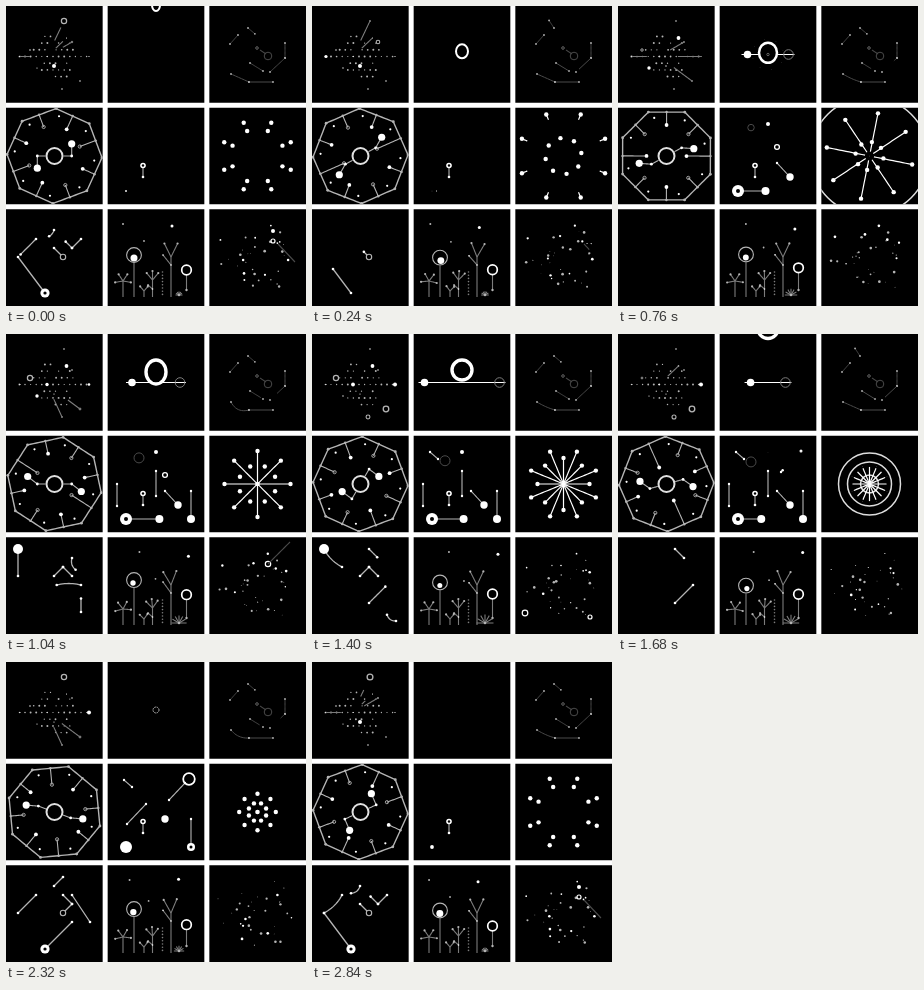
Recreate the animation shown at these times as an HTML page with a canvas. Size 300 by 300 pixels, loop 2.88 s.

```html
<!DOCTYPE html>
<html>
<head>
<meta charset="utf-8">
<style>
  html, body { margin: 0; width: 100%; height: 100%; overflow: hidden; background: #fff; }
  canvas { display: block; width: 300px; height: 300px; }
</style>
</head>
<body>
<canvas id="stage" width="300" height="300"></canvas>
<script>
const ctx = document.getElementById('stage').getContext('2d');
const TICKS = 72, TICK_MS = 40, GAP = 5, CELL = (300 - 2 * GAP) / 3;
const WHITE = '#fff', LIGHT = '#b4b4b4', GRAY = '#7c7c7c', DIM = '#4a4a4a', BLACK = '#000';
const TAU = Math.PI * 2, DEG = Math.PI / 180;
let tick = 0, turn = 0; // turn is the loop's progress in radians

const wrap = (v, size) => ((v % size) + size) % size;
const clamp = v => Math.max(0, Math.min(1, v));
const mix = (a, b, p) => a + (b - a) * p;
const smooth = v => (v = clamp(v), v * v * (3 - 2 * v));
const polar = (cx, cy, r, a) => [cx + r * Math.cos(a), cy + r * Math.sin(a)];

function seeded(seed) {
  return () => (seed = (seed * 16807) % 2147483647) / 2147483647;
}

// 0..1 envelope that fades in at one tick and is gone at another.
function shown(from, to, fade = 5) {
  const age = wrap(tick - from, TICKS), life = wrap(to - from, TICKS);
  return smooth(age / fade) * smooth((life - age) / fade);
}

// Eased value between [tick, value] points.
function keyed(...points) {
  let value = points[0][1];
  for (let i = 1; i < points.length; i++) {
    const [t0, v0] = points[i - 1], [t1, v1] = points[i];
    if (tick >= t0) value = mix(v0, v1, smooth((tick - t0) / (t1 - t0)));
  }
  return value;
}

function dot(x, y, r, color = WHITE) {
  if (r < .15) return;
  ctx.fillStyle = color;
  ctx.beginPath();
  ctx.arc(x, y, r, 0, TAU);
  ctx.fill();
}

function ring(x, y, r, width = 1, color = WHITE, ry = r) {
  if (r < .3) return;
  ctx.strokeStyle = color;
  ctx.lineWidth = width;
  ctx.beginPath();
  ctx.ellipse(x, y, r, Math.max(0, ry), 0, 0, TAU);
  ctx.stroke();
}

// Part of a line or of a bent stroke, between the fractions from and to.
function stroke([x1, y1], [x2, y2], { color = LIGHT, width = 1.1, bend = 0, from = 0, to = 1, ends = 0 } = {}) {
  if (to - from < .02) return;
  const length = Math.hypot(x2 - x1, y2 - y1) || 1;
  const point = p => {
    const sag = 4 * bend * p * (1 - p) / length;
    return [mix(x1, x2, p) - (y2 - y1) * sag, mix(y1, y2, p) + (x2 - x1) * sag];
  };
  ctx.strokeStyle = color;
  ctx.lineWidth = width;
  ctx.beginPath();
  for (let i = 0; i <= 12; i++) ctx.lineTo(...point(mix(from, to, i / 12)));
  ctx.stroke();
  if (ends) for (const p of [from, to]) dot(...point(p), ends);
}

// A stroke that grows from its start, rests, and leaves through its end.
function streak(a, b, start, span, options = {}) {
  const p = wrap(tick - start, TICKS) / span;
  if (p < 1) stroke(a, b, { ...options, from: clamp(4 * p - 3), to: clamp(4 * p) });
}

function dotField() {
  const center = [41, 50.5], random = seeded(29);
  for (let row = -3; row <= 3; row++) {
    for (let col = -6; col <= 6; col++) {
      const chance = random(), reach = Math.abs(col - .5) + Math.abs(row);
      if (row && (reach > 5 || chance > .55)) continue;
      const twinkle = .2 * Math.sin(turn + col + row * 2);
      dot(center[0] + 6 + col * 5.6 + (row % 2) * 2.5, center[1] + row * 6.7, .8 + twinkle, LIGHT);
    }
  }
  const satellite = (x, y, grow, shrink, r, hollow) => {
    const size = mix(.6, r, shown(grow, shrink, 8));
    if (hollow) ring(x, y, size, .6 + size * .25, LIGHT);
    else dot(x, y, size);
    if (Math.hypot(x - center[0], y - center[1]) < 25) return;
    const near = [mix(center[0], x, .45), mix(center[1], y, .45)];
    for (const start of [grow - 8, shrink - 8]) streak(near, [x, y], start, 12, { color: GRAY });
  };
  satellite(58, 15, 52, 6, 3, true);
  satellite(66, 36, 70, 18, 1.8, true);
  satellite(24, 44, 16, 44, 2.6, true);
  satellite(74, 75, 24, 60, 2.8, true);
  satellite(56, 83, 28, 58, 2, true);
  satellite(60.5, 32, 6, 44, 1.9);
  satellite(14, 50.5, 70, 20, 1.6);
  satellite(83, 50.5, 22, 66, 2);
  satellite(41, 50.5, 20, 44, 1.9);
  satellite(48, 60, 62, 20, 2);
  satellite(31, 62, 5, 36, 1.7);
}

function balance() {
  const cx = 150, cy = 48.5;
  const spread = keyed([6, 0], [12, 17], [26, 24], [35, 37.5], [48, 1.5]);
  const visible = shown(6, 54), gear = shown(7, 20);
  const half = (spread + 6) * shown(6, 49, 3);
  stroke([cx - half, cy], [cx + half, cy], { color: WHITE });

  if (tick < 46) {
    const y = keyed([0, -1], [7, 48], [17, 48], [26, 38], [36, 36], [45, -20]);
    const rx = keyed([0, 4], [12, 8], [26, 10]), ry = keyed([0, 6], [12, 8], [26, 12], [35, 10]);
    ctx.fillStyle = BLACK;
    ctx.beginPath();
    ctx.ellipse(cx, y, rx, ry, 0, 0, TAU);
    ctx.fill();
    ring(cx, y, rx, keyed([0, 2], [14, 2], [26, 3.4]), WHITE, ry);
  }
  ring(cx, cy, 11.5 * gear, 2.4 * gear + .1);
  for (let i = 0; i < 16; i++) dot(...polar(cx, cy, 13 * gear, i / 16 * TAU), gear);
  for (let i = 0; i < 8; i++) {
    const [x, y] = polar(cx, cy, mix(14, 28, gear), (i / 8 + tick / 90) * TAU);
    dot(x, y, 2 * gear, LIGHT);
    dot(x + 1, y + .7, 1.5 * gear, BLACK);
  }
  ring(cx + spread, cy, 4.8 * visible, 1, GRAY);
  dot(cx - spread, cy, 3.8 * visible);
  ctx.setLineDash([1.6, .8]);
  ring(cx, 48, 3 * shown(53, 65), 1, LIGHT);
  ctx.setLineDash([]);
}

function constellation() {
  const swing = turn * 2, wave = Math.cos(swing);
  const pivot = [242, 22], tip = polar(...pivot, 9, .7 - 3.8 * Math.max(0, Math.sin(swing)) ** 2);
  const link = (a, b, options) => {
    stroke(a, b, { color: DIM, width: 1, ...options });
    dot(...a, .9, LIGHT);
    dot(...b, .9, LIGHT);
  };
  link([224, 38], [232, 29]);
  link(pivot, tip);
  link([279, 37], [279, 52]);
  link([279, 52], [264, 66], { to: .6 + .4 * wave });
  link([244, 57], [257, 65], { to: .85 + .15 * wave });
  link([225, 68], [243, 76], { bend: 4 * Math.max(0, -Math.sin(swing)) });
  link([243, 76], [267, 76]);
  stroke([254, 44], [260, 48], { color: DIM });
  ring(262, 50, 3.8, 1, DIM);
  ring(251, 42, 1.3, .8, GRAY);
}

function wheel() {
  const center = [48.5, 150], sides = 8, step = TAU / sides;
  const half = tick / 36, eased = Math.floor(half) + smooth(half % 1);
  const spin = -88 * DEG - eased * step, sweep = (-75 + (tick - 58) * 2.5) * DEG;
  for (let i = 0; i < sides; i++) {
    const a = spin + i * step, middle = a + step / 2;
    const pull = Math.abs(Math.cos(middle - sweep)) ** 20;
    const vertex = polar(...center, 47.5, a), foot = polar(...center, 44, middle);
    const head = polar(...center, 31 - 13 * pull, middle);
    stroke(vertex, polar(...center, 47.5, a + step), { width: 1.4 });
    stroke(foot, head);
    dot(...vertex, 1.4, LIGHT);
    dot(...foot, 1.2, LIGHT);
    dot(...polar(...center, 40, a + step * .1), 1.1);
    if (i % 2) ring(...head, 1.6, .9, LIGHT);
    else dot(...head, 1.9);
  }
  ring(...center, 8, 2, '#e0e0e0');
  const upper = keyed([0, 0], [12, -57], [26, 0], [35, -60], [48, 20], [58, 20], [72, -25]) * DEG;
  const lower = keyed([0, -90], [12, -30], [26, 38], [48, 35], [58, 5], [72, -115]) * DEG;
  for (const side of [0, Math.PI]) {
    const joint = polar(...center, 17.2, upper + side), weight = polar(...joint, 12.2, lower + side);
    stroke(polar(...center, 9, upper + side), joint);
    stroke(joint, weight);
    dot(...joint, 1.4);
    dot(...weight, 3.6);
  }
}

function rods() {
  const rod = (a, b, from, to) => stroke(a, b, { to: shown(from, to), ends: 1.2 });
  const donut = (x, y, r, hole) => {
    dot(x, y, r);
    dot(x, y, hole, BLACK);
  };
  stroke([137, 159], [137, 171], { ends: 1.3 });
  donut(137, 159.5, 2.8, 1.2);

  rod([118, 118], [126, 125], 26, 70);
  ring(133, 124 + 4 * Math.sin(turn - 2.3), 5 * shown(16, 56), 1, DIM);
  dot(150, 118, 2 * shown(6, 43));
  rod([150, 162], [150, 137], 19, 55);
  ring(159, 141, 2.4 * shown(6, 32), 1.3);
  rod([147, 153], [152, 148], 7, 18);
  rod([121, 162], [140, 142], 42, 65);
  rod([111, 172], [111, 150], 19, 55);

  const slide = keyed([48, 0], [57, 1]), weight = 3.7 * shown(6, 67);
  rod([172, 171], [159, 157], 12, 54);
  dot(mix(172, 159, slide), mix(171, 157, slide), weight);
  rod([185, 185], [185, 157], 19, 63);
  donut(185, 185, 4 * shown(19, 68), 1.5 * shown(50, 68));
  rod([163, 138], [179, 121], 41, 68);
  ring(183, 117, 5.8 * shown(41, 68), 1.8);

  const puck = shown(5, 54), puckX = 120 + 34 * Math.sin(Math.PI * clamp((tick - 4) / 50));
  if (puck) stroke([125, 185], [puckX, 185]);
  dot(puckX, 185, 4 * puck);
  donut(120, 185, 6 * shown(5, 2, 8), 2 * shown(6, 54));
}

function burst() {
  const center = [251.5, 150];
  for (const start of [7.2, 35.8, 37.6, 40.2, 42.8]) {
    const r = (tick - start) * 5;
    if (r > 0 && r < 72) ring(...center, r, 1.5, '#ddd');
  }
  const inner = keyed([0, 27], [12, 9.2], [26, 19], [35, 35], [46, 12], [58, 9.3], [71, 27]);
  const outer = keyed([0, 36], [12, 54], [26, 33], [35, 26], [46, 13], [58, 18.3], [71, 36]);
  const innerShift = keyed([0, .5], [11, 1], [14, 1], [25, 1.5]);
  const outerShift = keyed([0, .5], [13, .5], [25, 0], [58, 0], [71, .5]);
  const dotSize = 2.2 * (1 - shown(38, 58)), spokes = shown(15, 56);
  for (let i = 0; i < 8; i++) {
    const near = polar(...center, inner, (i + innerShift) * TAU / 8);
    const far = polar(...center, outer, (i + outerShift) * TAU / 8);
    stroke(center, near, { color: WHITE, width: 1.2, to: shown(28, 46) });
    stroke(center, far, { color: WHITE, width: 1.2, from: spokes ? 1 - spokes : 1 - .2 * shown(3, 16) });
    dot(...near, dotSize);
    dot(...far, dotSize);
  }
  dot(...center, 2.3 * (shown(18, 34) + shown(51, 66)));
}

function strokes() {
  // Columns and rows of a nine pixel lattice.
  const node = (col, row) => [12 + 9 * col, 215 + 9 * row];
  const draw = (start, span, a, b, bend = 0) =>
    streak(node(...a), node(...b), start, span, { bend, ends: 1.3, width: 1.3 });

  draw(6, 13, [0, 4], [5, 4]);
  draw(6, 13, [0, 5], [3.4, 7.6], -3);
  draw(6, 13, [4, 1], [5, 2]);
  draw(6, 13, [6, 1], [7, 2]);
  draw(6, 13, [7, 0], [7, 2]);

  draw(20, 12, [0, 0], [0, 3]);
  draw(20, 22, [4, 3], [5, 2]);
  draw(20, 22, [5, 2], [6, 3]);
  draw(21, 11, [4.3, 4], [7, 4], -1.5);
  draw(21, 11, [7, 5.5], [7, 7]);
  draw(21, 11, [6, 1], [6.4, 2.3], 2);

  draw(30, 11, [0, 0], [2, 2], 2);
  draw(30, 22, [5, 0], [6, 1]);
  draw(30, 22, [5, 6], [7, 4]);
  draw(31, 9, [7, 7.3], [8, 8], 2);

  draw(43, 11, [2.7, -.7], [2, 2], -3);
  draw(43, 11, [8, 5], [8, 8]);
  draw(44, 34, [5, 2], [6, 3]);

  draw(50, 28, [0, 4], [2, 2], tick > 60 ? 2 : 0);
  draw(53, 11, [4, 1], [5, 0]);
  draw(53, 11, [5, 4], [6, 3]);
  draw(53, 11, [6, 2], [8, 5]);
  draw(53, 11, [3, 8], [6, 5]);

  draw(63, 18, [0, 4], [3, 8]);
  draw(66, 11, [7, 2], [6, 3]);
  draw(66, 14, [4, 3], [5, 4]);
  draw(67, 6, [3, 1.8], [4, 1], 2);

  const hub = 4.6 * shown(53, 7);
  dot(...node(0, 0), 5 * shown(21, 42));
  dot(...node(7, 0), 2 * shown(6, 18));
  dot(...node(3, 8), hub);
  dot(...node(3, 8), hub * .35, BLACK);
  const eye = 2.7 * shown(43, 18);
  dot(...node(5, 4), eye, BLACK);
  ring(...node(5, 4), eye, 1.1, LIGHT);
}

function garden() {
  const ground = 291, wave = Math.cos(turn), sway = Math.sin(turn * 2);
  const stem = (x, top) => stroke([x, ground], [x, top], { color: GRAY });
  // A stem with a fan of twigs at its top.
  const sprig = (x, top, size, twigs, spread) => {
    stem(x, top);
    for (let i = 0; i < twigs; i++) {
      const tip = polar(x, top, size, (-90 + mix(-spread, spread, i / (twigs - 1)) + sway * 5) * DEG);
      stroke([x, top], tip, { color: GRAY });
      dot(...tip, 1.1, LIGHT);
    }
  };
  sprig(117, 275, 8, 4, 100);
  sprig(138, 285, 6, 2, 40);
  sprig(146.5, 274, 9, 3, 40);
  sprig(165, 251, 15, 2, 26);
  stroke([165, 259], [157, 249 + sway], { color: GRAY, ends: .8 });
  stroke([146.5, 283], [142, 279], { color: GRAY, ends: .8 });
  for (let y = 266; y < ground; y += 3.2) dot(156.5, y, .8, GRAY);

  const headY = 249 + 3 * sway;
  stem(128, headY + 8);
  ring(128, headY, 7.4, 1.1, LIGHT);
  dot(128 + sway, headY + 3, 3 + .5 * wave);

  const bulbY = 262 + 2 * wave;
  stroke([180.5, bulbY + 5], [180.5, 284], { color: GRAY });
  ring(180.5, bulbY, 4.8, 1.7);
  dot(180.5, 284, 1.2, LIGHT);

  for (let i = 0; i < 7; i++) {
    stroke([173, 289], polar(173, 289, 6 - 2.5 * wave, -Math.PI * i / 6), { color: GRAY });
  }
  dot(173, 289, 1.3, LIGHT);

  dot(176 - 10 * wave, 220 + 3 * Math.sin(turn), 1.5);
  dot(127 - 10 * wave, 218, 1, LIGHT);
  dot(145 - 7 * wave, 241 - 6 * wave, .9, LIGHT);
}

function starfield() {
  const random = seeded(77);
  for (let i = 0; i < 34; i++) {
    const x = 251 + (random() + random() - 1) * 42, y = 253 + (random() + random() - 1) * 38;
    const glow = .5 + .5 * Math.sin(turn + random() * TAU), heading = random() * TAU;
    dot(...polar(x, y, 4 * Math.sin(turn), heading), .35 + glow, i % 3 ? LIGHT : WHITE);
  }
  const flash = (x, y, r, at, hollow = true) => {
    const size = r * shown(at - 7, at + 7);
    if (hollow) ring(x, y, size, 1.2);
    else dot(x, y, size);
  };
  flash(267, 225, 2, 0, false);
  flash(229, 267, 2, 12, false);
  flash(246, 268, 2.6, 12);
  flash(262, 230, 2.7, 26);
  flash(213, 279, 2.8, 35);
  flash(278, 283, 2, 35);
  flash(283, 272, 2, 48);
  flash(267, 235, 2, 70);
  streak([284, 208], [262, 230], 21, 11, { color: DIM });
  streak([289, 256], [272, 238], 66, 13, { color: DIM });
  streak([300, 265], [277, 289], 7, 11, { color: DIM });
  streak([216, 233], [232, 249], 43, 11, { color: DIM });
}

const panels = [dotField, balance, constellation, wheel, rods, burst, strokes, garden, starfield];

function render(now) {
  tick = Math.floor(now / TICK_MS + 1e-6) % TICKS;
  turn = tick / TICKS * TAU;
  ctx.fillStyle = WHITE;
  ctx.fillRect(0, 0, 300, 300);
  panels.forEach((panel, i) => {
    ctx.save();
    ctx.beginPath();
    ctx.rect(i % 3 * (CELL + GAP), Math.floor(i / 3) * (CELL + GAP), CELL, CELL);
    ctx.clip();
    ctx.fillStyle = BLACK;
    ctx.fillRect(0, 0, 300, 300);
    panel();
    ctx.restore();
  });
  requestAnimationFrame(render);
}
requestAnimationFrame(render);
</script>
</body>
</html>
```
